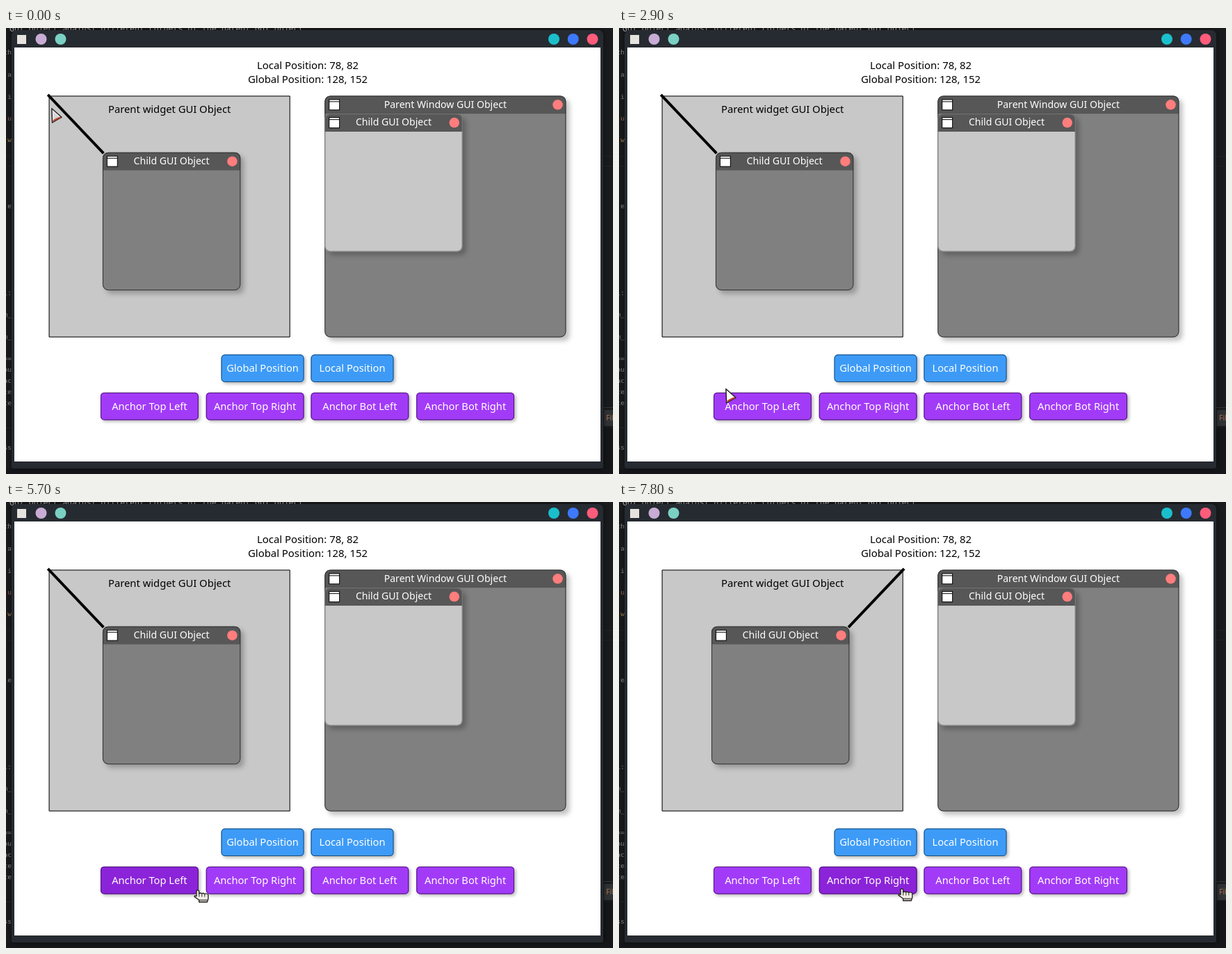
An HTML page with a canvas that plays this animation: 873x641 px, repeating every 8 s.

```html
<!DOCTYPE html>
<html lang="en">
<head>
<meta charset="utf-8">
<title>Anchor demo</title>
<style>
html, body { margin: 0; width: 100%; height: 100%; overflow: hidden; background: #1a1b1d; }
canvas { display: block; }
</style>
</head>
<body>
<canvas id="stage" width="873" height="641"></canvas>
<script>
const ctx = document.getElementById('stage').getContext('2d');
const LOOP = 8000, STEP = 100;
const SANS = '"Noto Sans", "Open Sans", sans-serif';
const MONO = '"DejaVu Sans Mono", monospace';

// The 850 x 600 app surface is shown slightly reduced inside its window.
const APP = { x: 12, y: 28, scale: 843 / 850 };

// Pointer hotspot on the stage: time, x, y
const PATH = [
  [0, 65, 115], [500, 65, 115], [800, 54, 102], [900, 54, 102],
  [1700, 126, 178], [1900, 126, 178], [2200, 130, 184], [2300, 126, 285],
  [2400, 121, 398], [2500, 121, 398], [2900, 153, 518], [3000, 157, 535],
  [3300, 154, 556], [3400, 154, 556], [4000, 222, 556], [4300, 253, 559],
  [4400, 254, 559], [5300, 254, 559], [6200, 301, 555], [6400, 301, 555],
  [6700, 345, 553], [7100, 406, 555], [LOOP, 406, 555]
];
const PRESSES = [4700, 7700];
const MOVE_AT = 7800;

const BLUE = { idle: '#3d9bf7', edge: '#184a78' };
const PURPLE = { idle: '#a23bf8', hover: '#8b24d9', press: '#7119b5', edge: '#47146f' };
const BUTTONS = [
  [300, 445, 120, 'Global Position', BLUE],
  [430, 445, 120, 'Local Position', BLUE],
  [125, 500, 142, 'Anchor Top Left', PURPLE],
  [278, 500, 142, 'Anchor Top Right', PURPLE],
  [430, 500, 142, 'Anchor Bot Left', PURPLE],
  [583, 500, 142, 'Anchor Bot Right', PURPLE]
];
const BUTTON_H = 40;

// Parent widget and the offset its child keeps from the anchored corner
const WIDGET = { x: 50, y: 70, size: 350 };
const OFFSET = { x: 78, y: 82 };
const CHILD = 200;

const EDITOR = [
  ['ch', 38], ['a', 70], ['i', 102], ['u', 133, '#a5695f'], ['w', 164, '#a8834f'],
  ['e', 259], ['l:', 384], ['m_', 415], ['m_', 447], ['==', 478], ['ou', 494],
  ['ac', 510], ['te', 526], ['te', 542], ['ss', 606]
];

function text(str, x, y, size, color, align = 'center', family = SANS) {
  ctx.font = `${size}px ${family}`;
  ctx.textAlign = align;
  ctx.fillStyle = color;
  ctx.fillText(str, x, y);
}

function rect(x, y, w, h, color) {
  ctx.fillStyle = color;
  ctx.fillRect(x, y, w, h);
}

function dot(x, y, r, color) {
  ctx.beginPath();
  ctx.arc(x, y, r, 0, Math.PI * 2);
  ctx.fillStyle = color;
  ctx.fill();
}

function rounded(x, y, w, h, r) {
  ctx.beginPath();
  ctx.roundRect(x, y, w, h, r);
}

function fillWithShadow(color, offset, blur, alpha) {
  ctx.save();
  ctx.shadowColor = `rgba(0,0,0,${alpha})`;
  ctx.shadowOffsetX = ctx.shadowOffsetY = offset;
  ctx.shadowBlur = blur;
  ctx.fillStyle = color;
  ctx.fill();
  ctx.restore();
}

// One pixel border lying just inside the box
function border(x, y, w, h, r, color) {
  rounded(x + 0.5, y + 0.5, w - 1, h - 1, r);
  ctx.strokeStyle = color;
  ctx.lineWidth = 1;
  ctx.stroke();
}

function desktop() {
  rect(0, 0, 873, 641, '#1a1b1d');
  rect(0, 184, 873, 1, '#222326');
  rect(0, 198, 873, 1, '#222326');
  text('GUI Object against different corners of the parent GUI object',
    5, 5, 11.5, '#a9aaab', 'left', MONO);
  for (const [str, y, color = '#8b8d90'] of EDITOR) text(str, 8, y, 9.5, color, 'right', MONO);
  rect(859, 545, 14, 1, '#34373a');
  rect(860, 549, 13, 23, '#303336');
  text('Fil', 863, 564, 10.5, '#a9714f', 'left');
  rect(0, 574, 8, 1, '#26282b');
  rect(859, 574, 14, 67, '#141618');
  rect(0, 633, 873, 8, '#15171a');
}

function frame() {
  rounded(8, 3, 851, 630, [7, 7, 3, 3]);
  fillWithShadow('#262b31', 0, 8, 0.5);
  rect(12, 28, 843, 595, '#fff');
  rect(16, 10, 13, 13, '#e6e3df');
  dot(50.5, 16, 8, '#c9acd5');
  dot(78.5, 16, 8, '#7bd0c4');
  dot(788, 16, 8, '#1bbfcb');
  dot(815.7, 16, 8, '#3d79fa');
  dot(843.5, 16, 8, '#ff5c7c');
}

function panel(x, y, size, title, body, edge) {
  rounded(x, y, size, size, 8);
  fillWithShadow(body, 5, 7, 0.25);
  ctx.save();
  ctx.clip();
  rect(x, y, size, 26, '#575757');
  ctx.restore();
  border(x, y, size, size, 8, edge);
  rect(x + 6, y + 5, 16, 16, '#000');
  rect(x + 7, y + 6, 14, 2, '#fff');
  rect(x + 7, y + 9, 14, 11, '#fff');
  dot(x + size - 12, y + 13, 7.3, '#ff7d7d');
  text(title, x + size / 2, y + 17.3, 14.2, '#fff');
}

function button([x, y, w, label, style], state) {
  rounded(x, y, w, BUTTON_H, 5);
  fillWithShadow(style[state] || style.idle, 2.5, 4, 0.27);
  border(x, y, w, BUTTON_H, 5, style.edge);
  text(label, x + w / 2, y + 25.2, 14.8, '#fff');
}

function arrow(x, y, fill) {
  ctx.save();
  ctx.translate(x, y);
  ctx.lineJoin = 'round';
  const shape = new Path2D('M.8 .8 L15 13.2 Q9 16 1.6 21 Z');
  ctx.fillStyle = '#fff';
  ctx.fill(shape);
  ctx.fillStyle = fill;
  ctx.fill(new Path2D('M2.6 4.5 L11.8 12.7 L3 17 Z'));
  ctx.strokeStyle = '#27221f';
  ctx.lineWidth = 1.5;
  ctx.stroke(shape);
  ctx.strokeStyle = '#c54731';
  ctx.lineWidth = 2;
  ctx.stroke(new Path2D('M2.7 18.6 Q8 15 13.3 13.2'));
  ctx.restore();
}

function hand(x, y) {
  ctx.save();
  ctx.translate(x - 5, y);
  ctx.lineJoin = 'round';
  const shape = new Path2D('M4 9.5 V2 Q5.8 -.6 7.6 2 V6 Q9.8 4.2 11.6 6 ' +
    'Q13.8 4.5 15.6 6.4 Q18 5 20.8 7.2 V13.5 L19.3 18 H7.6 V15 ' +
    'L1.2 10.4 Q.2 7.8 4 9.5 Z');
  ctx.fillStyle = '#f1eee6';
  ctx.fill(shape);
  rect(8, 15.2, 11.4, 2.6, '#c9c5bb');
  ctx.strokeStyle = '#2a2624';
  ctx.lineWidth = 1.4;
  ctx.stroke(shape);
  ctx.lineWidth = 1;
  ctx.stroke(new Path2D('M7.8 6 V10.5 M11.8 6.2 V10.5 M15.8 6.5 V10.5 M8 15 H19.6'));
  ctx.restore();
}

function pointerAt(t) {
  const i = PATH.findIndex(key => key[0] > t);
  const [t0, x0, y0] = PATH[i - 1], [t1, x1, y1] = PATH[i];
  const k = (t - t0) / (t1 - t0);
  return [Math.round(x0 + (x1 - x0) * k), Math.round(y0 + (y1 - y0) * k)];
}

function parentWidget(anchorRight, childX, childY) {
  const { x, y, size } = WIDGET;
  rect(x, y, size, size, '#c8c8c8');
  border(x, y, size, size, 0, '#000');
  text('Parent widget GUI Object', x + size / 2, y + 25, 14.9, '#000');
  ctx.save();
  ctx.beginPath();
  ctx.moveTo(anchorRight ? x + size : x, y);
  ctx.lineTo(anchorRight ? childX + CHILD : childX, childY);
  ctx.lineWidth = 4;
  ctx.lineCap = 'square';
  ctx.strokeStyle = '#000';
  ctx.stroke();
  ctx.restore();
  panel(childX, childY, CHILD, 'Child GUI Object', '#808080', '#303030');
}

function app(anchorRight, hovered, pressed) {
  const childX = anchorRight
    ? WIDGET.x + WIDGET.size - OFFSET.x - CHILD
    : WIDGET.x + OFFSET.x;
  const childY = WIDGET.y + OFFSET.y;

  ctx.save();
  ctx.translate(APP.x, APP.y);
  ctx.scale(APP.scale, APP.scale);
  text(`Local Position: ${OFFSET.x}, ${OFFSET.y}`, 425.5, 31, 15, '#000');
  text(`Global Position: ${childX}, ${childY}`, 425.5, 51, 15, '#000');
  parentWidget(anchorRight, childX, childY);
  panel(450, 70, 350, 'Parent Window GUI Object', '#808080', '#303030');
  panel(450, 96, CHILD, 'Child GUI Object', '#c8c8c8', '#707070');
  for (const b of BUTTONS) button(b, b !== hovered ? 'idle' : pressed ? 'press' : 'hover');
  ctx.restore();
}

function draw(t) {
  const [px, py] = pointerAt(t);
  const ax = (px - APP.x) / APP.scale, ay = (py - APP.y) / APP.scale;
  const pressed = PRESSES.some(p => t >= p && t < p + STEP);
  const hovered = BUTTONS.find(([x, y, w]) =>
    ax >= x && ax <= x + w && ay >= y && ay <= y + BUTTON_H);

  desktop();
  frame();
  app(t >= MOVE_AT, hovered, pressed);
  if (hovered) hand(px, py);
  else arrow(px, py, t < 600 ? '#d6d6d6' : '#fff');
}

function tick() {
  const t = performance.now() % LOOP;
  draw(Math.floor(t / STEP) * STEP);
  requestAnimationFrame(tick);
}
tick();
</script>
</body>
</html>
```
